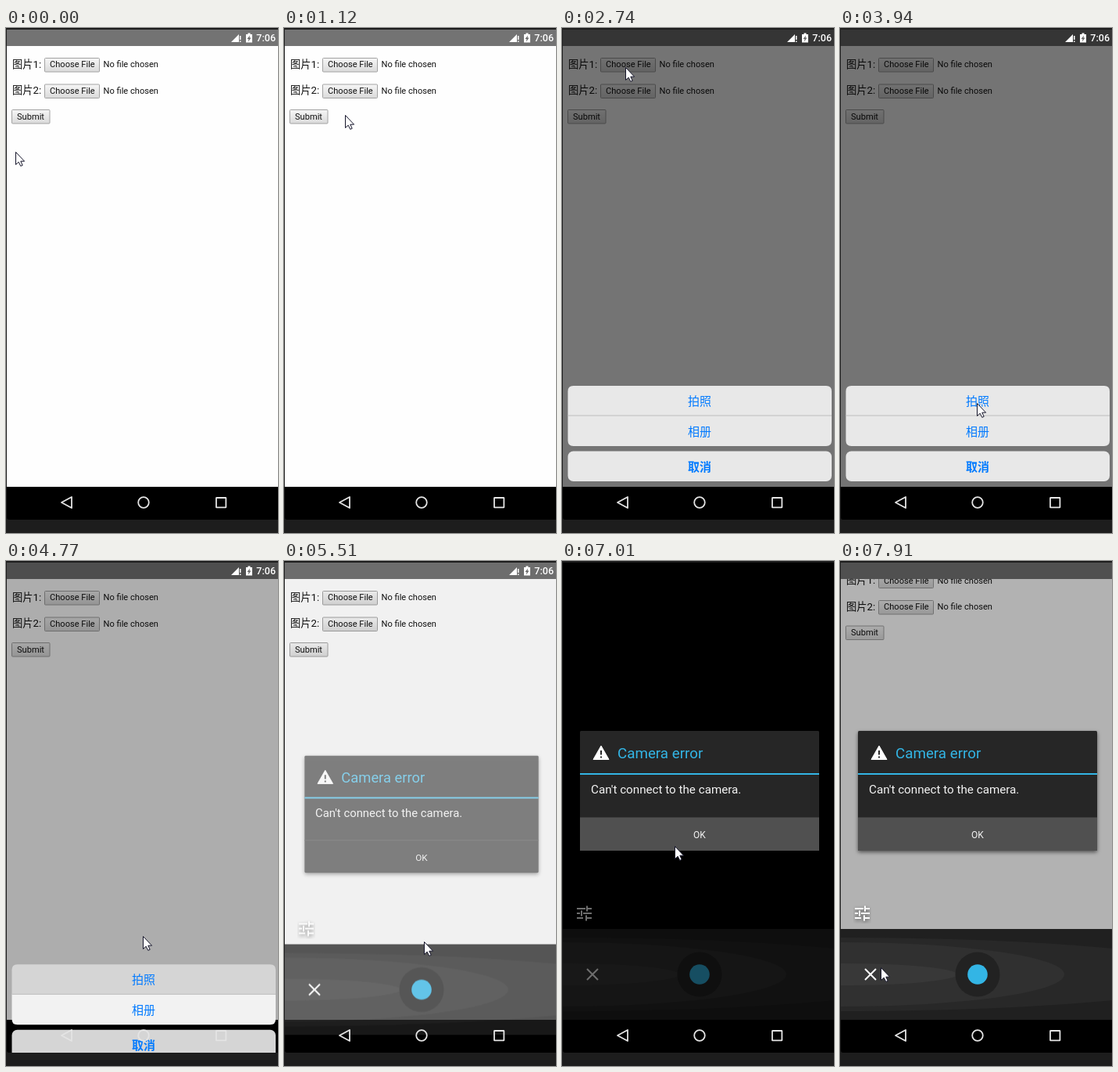
Write an HTML page that moves like this. It is 348x645 px and loops after 8 s.

```html
<!DOCTYPE html>
<html lang="en">
<head>
<meta charset="utf-8">
<title>File chooser on a phone</title>
<style>
  html, body { margin: 0; width: 100%; height: 100%; overflow: hidden; background: #1d1d1d; }
  svg { display: block; width: 348px; height: 645px; }
  text { font-family: Roboto, "Noto Sans CJK SC", "Noto Sans CJK", sans-serif; white-space: pre; }
  .label { font-size: 13.3px; fill: #111; }
  .control { font-size: 11.1px; fill: #111; }
  .button { fill: url(#face); stroke: #a2a2a2; }
  .sheet { font-size: 15px; fill: #007aff; text-anchor: middle; }
  .line { fill: none; stroke: #e4e4e4; stroke-width: 1.8; }
</style>
</head>
<body>
<svg viewBox="0 0 348 645">
  <defs>
    <linearGradient id="face" x2="0" y2="1">
      <stop stop-color="#f6f6f6"/><stop offset="1" stop-color="#dadada"/>
    </linearGradient>
    <clipPath id="screen"><path d="M1 2H348V628H4Q1 628 1 625Z"/></clipPath>
    <clipPath id="bar"><rect y="470" width="348" height="116"/></clipPath>
    <filter id="shadow" x="-10%" y="-10%" width="120%" height="125%">
      <feDropShadow dx="0" dy="2" stdDeviation="2.5" flood-opacity=".55"/>
    </filter>
  </defs>
  <rect width="348" height="645" fill="#1d1d1d"/>
  <g clip-path="url(#screen)">
    <rect y="2" width="348" height="584" fill="#fefefe"/>
    <g id="page">
      <text class="label" x="8" y="50.5">图片1:</text>
      <rect id="chooser" class="button" x="49.5" y="38.5" width="70" height="17.5" rx="1"/>
      <text class="control" x="56" y="50.3">Choose File</text>
      <text class="control" x="124.5" y="50.3">No file chosen</text>
      <text class="label" x="8" y="84">图片2:</text>
      <rect class="button" x="49.5" y="72" width="70" height="17.5" rx="1"/>
      <text class="control" x="56" y="83.6">Choose File</text>
      <text class="control" x="124.5" y="83.6">No file chosen</text>
      <rect class="button" x="7.5" y="104.5" width="48.5" height="17.5" rx="1"/>
      <text class="control" x="14" y="116.5">Submit</text>
    </g>
    <rect y="2" width="348" height="21" fill="#737373"/>
    <rect id="shade" y="2" width="348" height="584"/>
    <g id="status" fill="#fff">
      <path d="M288 18L298 8V18ZM299 10h1.5v5H299zM299 16.5h1.5V18H299z"/>
      <path d="M307 8h2.5V6.5h3V8H315v10.5h-8z"/>
      <path d="M312 9.5l-3.5 4.5h2l-.6 3.5 3.6-5h-2z" fill="#666"/>
      <text x="345" y="17" font-size="12.5" font-weight="500" text-anchor="end">7:06</text>
    </g>
    <rect y="586" width="348" height="42"/>

    <g id="sheet">
      <path id="photo" d="M7.5 495V464Q7.5 457 14.5 457H338Q345 457 345 464V495Z"/>
      <path id="album" d="M7.5 495V527Q7.5 534 14.5 534H338Q345 534 345 527V495Z"/>
      <path d="M7.5 495H345" stroke="#bdbdbd"/>
      <rect id="cancel" x="7.5" y="540.5" width="337.5" height="38.5" rx="7"/>
      <text class="sheet" x="176" y="482">拍照</text>
      <text class="sheet" x="176" y="520.5">相册</text>
      <text class="sheet" x="176" y="565.5" font-weight="700">取消</text>
    </g>

    <g id="camera">
      <rect id="preview" y="2" width="348" height="584"/>
      <g clip-path="url(#bar)">
        <rect y="470" width="348" height="116" fill="#202020"/>
        <ellipse cy="528" rx="490" ry="47" fill="#282828"/>
        <ellipse cy="528" rx="287" ry="41" fill="#303030"/>
        <ellipse cy="528" rx="150" ry="14" fill="#383838"/>
      </g>
      <circle cx="176" cy="528" r="28.5" fill="#222"/>
      <circle cx="176" cy="528" r="12.8" fill="#33b5e5"/>
      <path d="M32 521l14 14M46 521l-14 14" stroke="#fff" stroke-width="2"/>
      <path d="M19 444h11M33 444h5M19 450h4M27 450h11M19 456h8M31 456h7M32 440.5v7M25 446.5v7M31 452.5v7"
        stroke="#fff" stroke-width="2" filter="url(#shadow)"/>
      <rect id="dim" y="2" width="348" height="584" opacity=".57"/>
    </g>

    <g id="dialog">
      <rect x="23" y="217" width="306" height="153" rx="1.5" fill="#282828" filter="url(#shadow)"/>
      <path d="M23 327.5H329" stroke="#3c3c3c"/>
      <rect id="okay" x="23" y="328" width="306" height="42" fill="#505050"/>
      <rect x="23" y="271" width="306" height="2" fill="#33b5e5"/>
      <path d="M50 236L60 253.5H40Z" fill="#fff" stroke="#fff" stroke-linejoin="round"/>
      <path d="M50 242v5.5M50 249.5v2" stroke="#282828" stroke-width="2"/>
      <text x="71" y="252" font-size="18.8" fill="#33b5e5">Camera error</text>
      <text x="37" y="297" font-size="15.2" fill="#f3f3f3">Can't connect to the camera.</text>
      <text x="176" y="354" font-size="12" fill="#f3f3f3" text-anchor="middle">OK</text>
    </g>

    <path class="line" d="M71 606L84 599V613Z" stroke-linejoin="round"/>
    <circle class="line" cx="176" cy="606" r="6.8"/>
    <rect class="line" x="269" y="600" width="12.4" height="12.4" rx=".5"/>
  </g>
  <path id="cursor" d="M.5 .5V16.5L4.2 13.2L6.8 18.4L9.2 17.3L6.8 12.2H11.6Z" fill="#fff" stroke="#15152a"/>
</svg>
<script>
const LOOP = 8000;
const el = id => document.getElementById(id);
const set = (id, attrs) => {
  for (const name in attrs) el(id).setAttribute(name, attrs[name]);
};
const show = (id, visible) => set(id, { visibility: visible ? "visible" : "hidden" });

// Each move runs in even steps along its points: first step at start, last at end.
const moves = [
  { start: 120, end: 1120, steps: 7, points: [[12, 158], [48, 112], [85, 69], [78, 111]] },
  { start: 1270, end: 1780, steps: 5, points: [[78, 111], [75, 80], [81, 50]] },
  { start: 3160, end: 3940, steps: 7, points: [[81, 50], [125, 290], [175, 479]] },
  { start: 5510, end: 5510, steps: 1, points: [[175, 479], [179, 486]] },
  { start: 5650, end: 6310, steps: 6, points: [[179, 486], [64, 452]] },
  { start: 6460, end: 6730, steps: 3, points: [[64, 452], [144, 364]] },
  { start: 7280, end: 7780, steps: 5, points: [[144, 364], [52, 519]] }
];

function along(points, progress) {
  const position = progress * (points.length - 1);
  const i = Math.min(Math.floor(position), points.length - 2);
  return points[i].map((v, axis) => v + (points[i + 1][axis] - v) * (position - i));
}

function cursorAt(t) {
  const move = moves.filter(m => t >= m.start).pop();
  if (!move) return moves[0].points[0];
  const { start, end, steps, points } = move;
  const done = t >= end ? steps : Math.floor((t - start) / (end - start) * (steps - 1)) + 1;
  return along(points, done / steps);
}

// Held states: the last entry whose time has come applies.
const held = (t, states) => states.filter(([time]) => t >= time).pop()[1];

const shadeStates = [[0, 0], [2620, .25], [2740, .54], [4770, .32], [4900, 0],
  [5360, .02], [5510, .05], [7910, .3]];
const sheetStates = [[0, null], [2620, 75], [2740, 0], [4770, 58.3], [4900, null]];
const cameraStates = [
  [0, { alpha: 0, y: 0, dialog: 0, drop: 0, scale: 1 }],
  [5360, { alpha: .25, y: 42, dialog: 0, drop: 0, scale: 1 }],
  [5510, { alpha: .75, y: 19.5, dialog: .56, drop: 30, scale: .978 }],
  [5650, { alpha: 1, y: 0, dialog: 1, drop: 0, scale: 1 }]
];

function draw(t) {
  const closing = t >= 7910;
  const covered = t >= 5650 && !closing;
  const pressed = t >= 2220;
  set("chooser", { stroke: pressed ? "#777" : "#a2a2a2" });
  set("page", { transform: `translate(0 ${closing ? -21.5 : 0})` });
  set("shade", { opacity: held(t, shadeStates) });
  show("status", t < 5650);

  const slide = held(t, sheetStates);
  show("sheet", slide !== null);
  set("sheet", { transform: `translate(0 ${slide || 0})` });
  const chosen = t >= 4630;
  set("photo", { fill: chosen ? "#d5d5d5" : "#e8e8e8" });
  set("album", { fill: chosen ? "#f2f2f2" : "#e8e8e8" });
  set("cancel", { fill: chosen ? "#d5d5d5" : "#e8e8e8" });

  const { alpha, y, dialog, drop, scale } = held(t, cameraStates);
  set("camera", { opacity: alpha, transform: `translate(0 ${y})` });
  show("preview", covered);
  show("dim", covered);
  set("dialog", {
    opacity: dialog,
    transform: `translate(176 ${293.5 + drop}) scale(${scale}) translate(-176 -293.5)`
  });
  show("okay", t >= 7010);

  const [x, top] = cursorAt(t);
  set("cursor", { transform: `translate(${Math.round(x)} ${Math.round(top)})` });
}

const begin = performance.now();
function frame() {
  draw((performance.now() - begin) % LOOP);
  requestAnimationFrame(frame);
}
frame();
</script>
</body>
</html>
```
